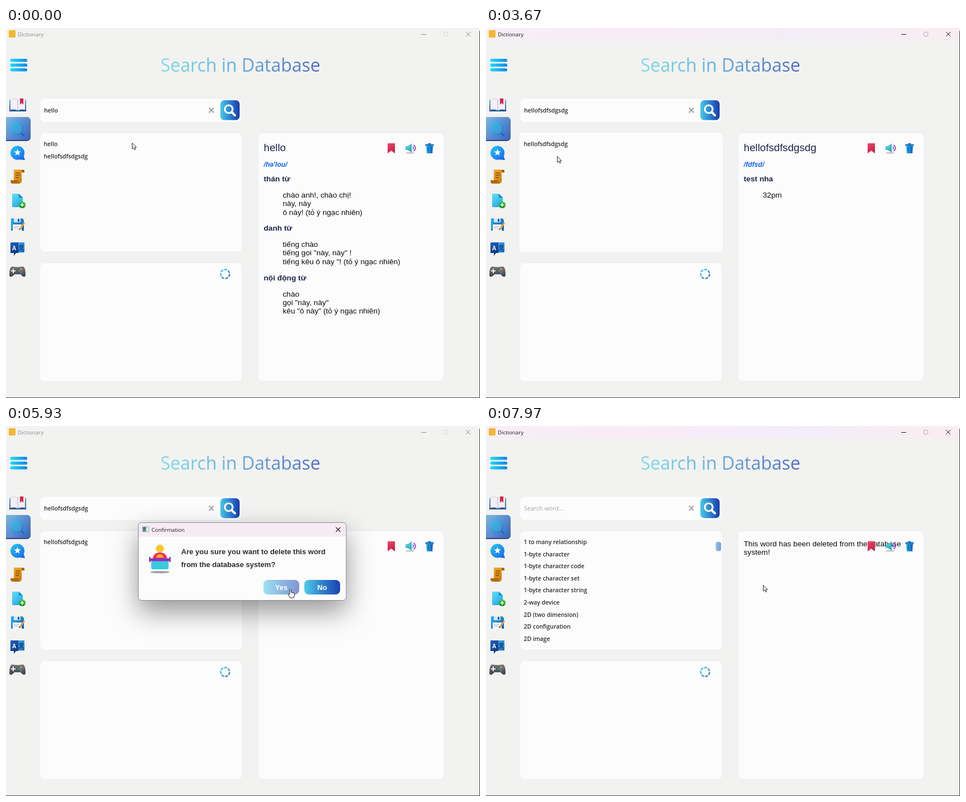
An HTML page with a canvas for the animation above (8 s loop, 847 by 661 pixels).

```html
<!DOCTYPE html>
<html lang="en">
<head>
<meta charset="utf-8">
<title>Dictionary</title>
<style>
html, body { margin: 0; width: 100%; height: 100%; overflow: hidden; background: #f2f2f1; }
canvas { display: block; }
</style>
</head>
<body>
<canvas id="stage" width="847" height="661"></canvas>
<script>
const W = 847, H = 661, LOOP = 8000;
const main = document.getElementById('stage').getContext('2d');
const layer = document.createElement('canvas');
layer.width = W;
layer.height = H;
let c = main;

const UI = '"Open Sans", "Noto Sans", sans-serif';
const ARIAL = '"Liberation Sans", Arial, sans-serif';
const clamp = v => Math.max(0, Math.min(1, v));
const smooth = p => p * p * (3 - 2 * p);
const easeOut = p => 1 - (1 - p) * (1 - p);

// Moments at which the interface changes
const FOCUS = 1950, PICK = 3100, ASK = 5060, ANSWER = 6120, NOTE = 6330, DONE = 7230;

// Pointer stops: time, x, y
const path = [
  [0, 225, 205], [770, 225, 205], [1570, 277, 155], [2050, 277, 155],
  [2950, 127, 229], [3900, 127, 229], [4750, 758, 221], [5270, 758, 221],
  [5800, 508, 291], [6170, 508, 291], [6600, 519, 276], [6700, 519, 276],
  [7000, 546, 277], [7270, 546, 277], [7800, 495, 284], [8000, 495, 284]
];

function pointerAt(t) {
  const i = path.findIndex(k => k[0] > t);
  const [t0, x0, y0] = path[i - 1], [t1, x1, y1] = path[i];
  const p = smooth((t - t0) / (t1 - t0));
  return { x: x0 + (x1 - x0) * p, y: y0 + (y1 - y0) * p };
}

function gradient(x0, y0, x1, y1, ...stops) {
  const g = c.createLinearGradient(x0, y0, x1, y1);
  stops.forEach((s, i) => g.addColorStop(i / (stops.length - 1), s));
  return g;
}

function box(x, y, w, h, r, fill, stroke) {
  c.beginPath();
  c.roundRect(x, y, w, h, r);
  paint(fill, stroke);
}

function disc(x, y, rx, fill, ry = rx) {
  c.beginPath();
  c.ellipse(x, y, rx, ry, 0, 0, 7);
  paint(fill);
}

function paint(fill, stroke, width = 1) {
  if (fill) { c.fillStyle = fill; c.fill(); }
  if (stroke) { c.strokeStyle = stroke; c.lineWidth = width; c.stroke(); }
}

// SVG path data drawn at an offset
function shape(d, x, y, fill, stroke, width = 1) {
  c.save();
  c.translate(x, y);
  const p = new Path2D(d);
  if (fill) { c.fillStyle = fill; c.fill(p); }
  if (stroke) { c.strokeStyle = stroke; c.lineWidth = width; c.stroke(p); }
  c.restore();
}

function text(str, x, y, font, color, align = 'left') {
  c.font = font;
  c.fillStyle = color;
  c.textAlign = align;
  c.fillText(str, x, y);
}

const cross = (x, y, r, color, width) =>
  shape(`M${-r} ${-r}L${r} ${r}M${r} ${-r}L${-r} ${r}`, x, y, null, color, width);

function titleBar(t, active) {
  const fade = t < ASK ? 1 : 1 - clamp((t - ASK - 60) / 200);
  c.globalAlpha = active ? 1 : t > FOCUS && t < DONE ? fade : 0;
  c.fillStyle = gradient(0, 0, W, 0, '#f7eef6', '#f8ecf6', '#f3edf8', '#f9edf0');
  c.fillRect(0, 0, W, 23);
  c.globalAlpha = 1;
  const ink = active ? '#1c1c1c' : '#8b8b8b';
  box(5, 4, 12, 13, 1, '#f3b82f');
  text('Dictionary', 21, 15, `9.7px ${UI}`, ink);
  shape('M742 11.5H751', 0, 0, null, ink);
  box(782.5, 7.5, 7, 7, 1, null, active ? '#b3abb1' : '#d4d4d4');
  cross(826, 11, 4, ink, 1);
}

function bookIcon() {
  shape('M6 129H36V149H6Z', 0, 0, gradient(0, 129, 0, 149, '#4ba3dc', '#1f4f9a'));
  shape('M8 127Q15 125 21 128Q28 125 34 127V146Q28 144 21 147Q15 144 8 146Z', 0, 0, '#f3f0f4', '#c9c5d2', .7);
  shape('M21 128V147', 0, 0, null, '#b4b2c4');
  shape('M25 126H31V137L28 134L25 137Z', 0, 0, '#dc2148');
}

function searchIcon() {
  box(-5, 159, 49, 43, 7, '#2b4a86');
  box(-5, 159, 49, 41, 7, gradient(0, 160, 44, 198, '#78b9e3', '#5a8dd1', '#3a65bd'));
  c.lineCap = 'round';
  shape('M26 187L32 192', 0, 0, null, '#1d62bd', 2.5);
  c.lineCap = 'butt';
  disc(20, 180, 11, gradient(9, 170, 30, 190, '#29cdf2', '#1676c6'));
  disc(20, 180, 9, gradient(12, 172, 27, 188, '#35b5dc', '#4b93d2'));
}

function starIcon() {
  const blue = gradient(9, 211, 32, 236, '#22c8f8', '#1b63e8');
  disc(20.5, 223, 12.5, blue);
  shape('M23 235L34 236L30 224Z', 0, 0, blue);
  let d = '';
  for (let i = 0; i < 10; i++) {
    const a = i * Math.PI / 5 - Math.PI / 2, r = i % 2 ? 2.8 : 6.5;
    d += `${i ? 'L' : 'M'}${r * Math.cos(a)} ${r * Math.sin(a)}`;
  }
  shape(d + 'Z', 20.5, 222.5, '#fff');
}

function scrollIcon() {
  shape('M14 253H30Q33 253 33 258H28V274Q27 278 23 278H11Q8 277 8 272H14Z', 0, 0,
    gradient(10, 253, 28, 278, '#f3ad2c', '#c8780f'));
  shape('M28 258V255Q30 251 33 255V258Z', 0, 0, '#a85d0b');
  shape('M8 272H22Q22 277 25 278H11Q8 277 8 272Z', 0, 0, '#b8690d');
  shape('M17 259H25M17 263H25M17 267H23', 0, 0, null, '#8a4b08', 1.4);
}

function addIcon() {
  shape('M11 296H23L30 303V320H11Z', 0, 0, gradient(11, 296, 30, 320, '#5fe0f8', '#1fa0e4'));
  shape('M23 296L30 303H23Z', 0, 0, '#1784cc');
  disc(29, 316, 6, gradient(29, 310, 29, 322, '#4bc53c', '#16881c'));
  shape('M25.5 316H32.5M29 312.5V319.5', 0, 0, null, '#fff', 1.6);
}

function saveIcon() {
  shape('M9 340H29L32 343V362H9Z', 0, 0, gradient(9, 340, 32, 362, '#29b3ee', '#1458ac'));
  box(14, 340, 12, 7, 0, '#d8e6f1');
  box(21, 341, 3, 5, 0, '#28588e');
  box(12, 351, 16, 11, 0, '#f5f7fa');
  shape('M14 355H24M14 358H22', 0, 0, null, '#a9b9c9');
  shape('M23 359L32 347L34 349L26 360Z', 0, 0, '#f29a2a');
  shape('M23 361L23.5 358L26 360Z', 0, 0, '#5a3b20');
}

function translateIcon() {
  box(20, 383, 13, 18, 1, gradient(20, 383, 33, 401, '#3aa0e6', '#1c6dc6'));
  shape('M8 383H22V402H18L14 407V402H8Z', 0, 0, gradient(8, 383, 22, 405, '#1c62c0', '#123176'));
  text('A', 14.5, 397, `bold 10px ${ARIAL}`, '#fff', 'center');
  shape('M23 389H31M27 387V389M30 389Q28 395 23 397M24 390Q27 395 31 397', 0, 0, null, '#10264f', 1.2);
}

function padIcon() {
  shape('M11 426Q20 428 30 426Q35 427 35 442Q33 448 26 440H15Q8 448 6 442Q6 427 11 426Z', 0, 0,
    gradient(0, 426, 0, 445, '#75797e', '#3d4146'));
  shape('M9 434H17M13 430V438', 0, 0, null, '#eee', 2);
  [[27, 431, '#e7c52d'], [30, 434, '#e44b43'], [27, 437, '#3f8ee4'], [24, 434, '#48b65d']]
    .forEach(([x, y, col]) => disc(x, y, 1.5, col));
}

function sidebar() {
  [55, 63.5, 72].forEach(y => box(7.5, y, 30.5, 5.5, 2.5, gradient(8, y, 38, y + 5, '#16dffa', '#1681ee')));
  [bookIcon, searchIcon, starIcon, scrollIcon, addIcon, saveIcon, translateIcon, padIcon].forEach(f => f());
}

const panel = (x, y, w, h) => box(x, y, w, h, 8, '#fcfcfc', '#e6f1f6');

function searchBar(t) {
  panel(60.5, 125.5, 361, 43);
  if (t < DONE) text(t < PICK ? 'hello' : 'hellofsdfsdgsdg', 68, 151, `600 10.4px ${UI}`, '#2b2b2b');
  else text('Search word...', 68, 151, `10.7px ${UI}`, '#a2a2a2');
  cross(367, 147, 4.2, '#a5a5a5', 2);
  box(383, 129, 34.5, 35.5, 7, gradient(383, 0, 417, 0, '#47cbe9', '#2e83d0', '#183cae'));
  c.lineCap = 'round';
  c.beginPath();
  c.arc(398, 145, 7, 0, 7);
  paint(null, '#fff', 3.2);
  shape('M403.5 150.5L409 156', 0, 0, null, '#fff', 4);
  c.lineCap = 'butt';
}

const allWords = ['1 to many relationship', '1-byte character', '1-byte character code',
  '1-byte character set', '1-byte character string', '2-way device',
  '2D (two dimension)', '2D configuration', '2D image'];

function wordList(t, hover) {
  const g = hover ? 1.5 : 0;
  panel(60.5 - g, 187.5 - g, 361.5 + 2 * g, 212.5 + 2 * g);
  const words = t < PICK ? ['hello', 'hellofsdfsdgsdg'] : t < DONE ? ['hellofsdfsdgsdg'] : allWords;
  words.forEach((w, i) => text(w, 67.5, 211 + 21.6 * i, `600 10.4px ${UI}`, '#2b2b2b'));
  if (t >= DONE) box(410.5, 207, 9.5, 16.5, 4, gradient(410, 0, 420, 0, '#93c2e4', '#719dd4'));
}

function spinner() {
  const g = gradient(383, 432, 400, 447, '#2fc5ec', '#2d9bdd', '#1c4fa5');
  for (let i = 0; i < 7; i++) {
    const a = i * Math.PI * 2 / 7;
    c.beginPath();
    c.arc(391.5, 439.5, 8, a, a + .66);
    paint(null, g, 2.2);
  }
}

const helloEntry = [
  ['thán từ', 274, ['chào anh!, chào chị!', 'này, này', 'ô này! (tỏ ý ngạc nhiên)']],
  ['danh từ', 362, ['tiếng chào', 'tiếng gọi "này, này" !', 'tiếng kêu ô này "! (tỏ ý ngạc nhiên)']],
  ['nội động từ', 450.5, ['chào', 'gọi "này, này"', 'kêu "ô này" (tỏ ý ngạc nhiên)']]
];
const testEntry = [['test nha', 274, ['32pm']]];

function entry(word, sound, parts) {
  text(word, 460.5, 220, `18.7px ${ARIAL}`, '#20244a');
  text(sound, 460.5, 248, `italic bold 12.2px ${ARIAL}`, '#0f66e6');
  parts.forEach(([kind, y, lines]) => {
    text(kind, 460.5, y, `bold 13.7px ${ARIAL}`, '#20244a');
    lines.forEach((l, i) => text(l, 494.5, y + 29 + 15.3 * i, `13.63px ${ARIAL}`, '#0c0c0c'));
  });
}

function entryIcons() {
  shape('M682 206H695V224L688.5 219L682 224Z', 0, 0, gradient(682, 206, 695, 224, '#f0476b', '#c4163f'));
  disc(722, 223, 8, '#c3cdd2', 1.8);
  shape('M714 211H718L725 206V222L718 218H714Z', 0, 0, gradient(714, 206, 725, 222, '#6fdbe4', '#219fb4'));
  [[3, '#2e88d8'], [6.5, '#b02bb4']].forEach(([r, col]) => {
    c.beginPath();
    c.arc(725, 214.5, r, -1, 1);
    paint(null, col, 1.7);
  });
  shape('M751 210H763L762 224H752Z', 0, 0, gradient(751, 0, 763, 0, '#23a6e4', '#176ac0'));
  box(749, 207.5, 15.5, 3, 1, '#1a80cf');
  box(754, 206, 5.5, 2, 1, '#155ca6');
  shape('M754.5 213V221M759.5 213V221', 0, 0, null, '#1356a0');
}

function entryPanel(t) {
  panel(450.5, 187.5, 332, 443.5);
  if (t < PICK) entry('hello', "/hə'lou/", helloEntry);
  else if (t < DONE) entry('hellofsdfsdgsdg', '/fdfsd/', testEntry);
  else {
    text('This word has been deleted from the database', 460.5, 215, `13.63px ${ARIAL}`, '#0c0c0c');
    text('system!', 460.5, 230, `13.63px ${ARIAL}`, '#0c0c0c');
  }
  entryIcons();
}

function button(label, x, y, hover) {
  c.globalAlpha = hover ? .55 : 1;
  box(x, y, 64, 26, 8, gradient(x, 0, x + 64, 0, '#50cbe9', '#2f80cc', '#1b42b4'));
  c.globalAlpha = 1;
  text(label, x + 32, y + 17.5, `bold 13px ${ARIAL}`, '#fff', 'center');
}

function dialogFrame(x, y, w, h, title) {
  c.save();
  c.shadowColor = 'rgba(0,0,0,.4)';
  c.shadowBlur = 46;
  c.shadowOffsetY = 20;
  box(x, y, w, h, 6, '#fcfcfc');
  c.restore();
  box(x, y, w, 25, [6, 6, 0, 0], '#f6ebf3');
  box(x, y, w, h, 6, null, '#8e8a8e');
  box(x + 7.5, y + 7.5, 11, 9, 0, '#f4f6f6', '#9aa4a6');
  box(x + 8, y + 8, 6, 8, 0, gradient(0, y + 8, 0, y + 16, '#3d6f8c', '#4b9a86'));
  text(title, x + 23.5, y + 16.5, `9.65px ${UI}`, '#1c1c1c');
  cross(x + w - 14.5, y + 12.5, 4, '#1c1c1c', 1.1);
}

function askDialog(pt, usable) {
  dialogFrame(236.5, 172.5, 371.5, 139, 'Confirmation');
  disc(275, 261, 17, '#a6a8aa', 2.3);
  disc(275, 219, 7.2, '#f8c62e');
  shape('M262 238Q263 226 275 226Q287 226 288 238Z', 0, 0, '#e8344e');
  shape('M268 235Q270 229 275 229Q280 229 282 235Z', 0, 0, '#f7b32f');
  box(259.5, 241, 31, 15, 3, '#37cbdc');
  shape('M257 234V243M293 234V243', 0, 0, null, '#7d2bb3', 2.4);
  box(257, 236.5, 36, 5, 2, '#8d30c0');
  const font = `bold 13px ${ARIAL}`;
  text('Are you sure you want to delete this word', 313, 228.5, font, '#2d2d2d');
  text('from the database system?', 313, 252, font, '#2d2d2d');
  button('Yes', 460, 275, usable && inside(pt, 460, 275, 64, 26));
  button('No', 533, 275, usable && inside(pt, 533, 275, 64, 26));
}

function noteDialog(pt, usable) {
  dialogFrame(243.5, 177.5, 357.5, 124.5, 'Notification!');
  const gold = gradient(264, 0, 286, 0, '#fbd032', '#f0ad17');
  disc(275, 246.5, 4, '#dc930f');
  disc(275, 220, 3, '#e8a116');
  shape('M261 246Q266 241 266 232Q266 220 275 220Q284 220 284 232Q284 241 289 246Z', 0, 0, gold);
  [[8.5 + 5, 0], [17.5, 0]].forEach(([r]) => {
    [0, Math.PI].forEach(a => {
      c.beginPath();
      c.arc(275, 230, r, a - .6, a + .6);
      paint(null, '#f3bb27', 2);
    });
  });
  text('Successfully!', 306, 233, `bold 12.8px ${ARIAL}`, '#2d2d2d');
  button('OK', 526, 265, usable && inside(pt, 526, 265, 64, 26));
}

// Draws a dialog as one group that grows and fades in, then shrinks and fades out
function showDialog(t, from, to, cx, cy, draw, pt) {
  if (t < from || t > to + 130) return;
  const p = t < to ? easeOut(clamp((t - from) / 180)) : 1 - clamp((t - to) / 130);
  const s = .82 + .18 * p;
  c = layer.getContext('2d');
  c.clearRect(0, 0, W, H);
  draw(pt, t > from + 200);
  c = main;
  c.save();
  c.globalAlpha = p;
  c.translate(cx, cy);
  c.scale(s, s);
  c.translate(-cx, -cy);
  c.drawImage(layer, 0, 0);
  c.restore();
}

const inside = (p, x, y, w, h) => p.x >= x && p.x <= x + w && p.y >= y && p.y <= y + h;

function pointer(t, p) {
  const onYes = t > ASK + 200 && t < ANSWER && inside(p, 460, 275, 137, 26);
  const onOk = t > NOTE + 200 && t < DONE && inside(p, 526, 265, 64, 26);
  const x = Math.round(p.x), y = Math.round(p.y);
  c.lineJoin = 'round';
  if (onYes || onOk) {
    shape('M-1 10V1.5Q0 0 1.5 1.5V6L6 7.5Q8 8 7.5 11L6 16H0L-4 10Q-3 8 -1 10Z', x, y, '#fff', '#222');
  } else if (inside(p, 60, 125, 305, 43)) {
    shape('M-3 -5.5H3M-3 5.5H3M0 -5.5V5.5', x + .5, y + .5, null, '#333');
  } else {
    shape('M.5 .5V11L3 8.8L4.8 12.6L6.5 11.8L4.8 8.2H8Z', x, y, '#fff', '#2a2a2a');
  }
}

function draw(t) {
  const p = pointerAt(t);
  const active = t >= FOCUS && t < ASK || t >= DONE + 60;
  c.fillStyle = '#f2f2f1';
  c.fillRect(0, 0, W, H);
  titleBar(t, active);
  text('Search in Database', 276, 78, `500 32px ${UI}`, gradient(276, 0, 568, 0, '#7fe0e6', '#67aad6', '#4c6bc2'));
  sidebar();
  searchBar(t);
  wordList(t, active && inside(p, 60, 187, 362, 213));
  panel(60.5, 419.5, 361.5, 212);
  spinner();
  entryPanel(t);
  c.fillStyle = '#45454b';
  c.fillRect(846, 5, 1, H);
  c.fillRect(0, 660, W, 1);
  showDialog(t, ASK, ANSWER, 372, 225, askDialog, p);
  showDialog(t, NOTE, DONE, 422, 240, noteDialog, p);
  pointer(t, p);
}

const start = performance.now();
function tick() {
  draw((performance.now() - start) % LOOP);
  requestAnimationFrame(tick);
}
tick();
</script>
</body>
</html>
```
